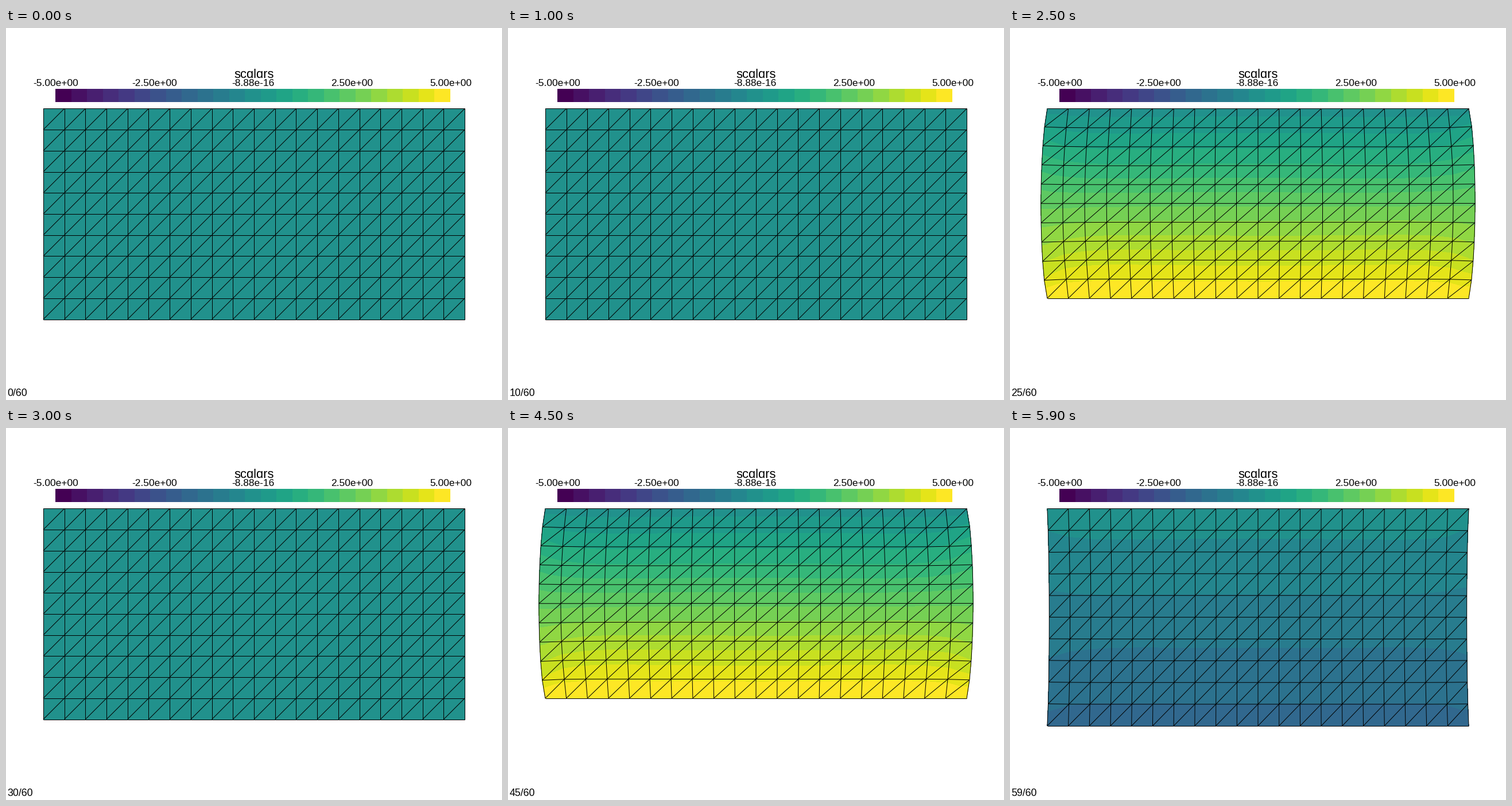
A matplotlib script for the animation above (6 s loop, 864 px wide and 648 px high).

```python
import numpy as np
import matplotlib.pyplot as plt
from matplotlib.animation import FuncAnimation
from matplotlib.collections import LineCollection
from matplotlib.patches import Rectangle
from matplotlib.tri import Triangulation

W, H, DPI = 864, 648, 72
FRAMES, PERIOD = 60, 20
NX, NY = 20, 10
LENGTH, HEIGHT = 100.0, 50.0
PULL, POISSON = 5.0, 0.3
SCALE = 7.342                # pixels per length unit
LEFT, BOTTOM = 64.9, 507.5
BINS = 25
FONT = ["Liberation Sans", "DejaVu Sans"]


def make_mesh():
    gx, gy = np.meshgrid(np.linspace(0, LENGTH, NX + 1),
                         np.linspace(0, HEIGHT, NY + 1))
    points = np.column_stack([gx.ravel(), gy.ravel()])
    cells = []
    for j in range(NY):
        for i in range(NX):
            a = j * (NX + 1) + i
            b, c, d = a + 1, a + NX + 2, a + NX + 1
            cells += [(a, b, c), (a, c, d)]
    return points, np.array(cells)


def solve_elastic(points, cells):
    """Plane-strain displacement: top clamped, bottom moved up by PULL."""
    lam = POISSON / ((1 + POISSON) * (1 - 2 * POISSON))
    mu = 1 / (2 * (1 + POISSON))
    law = np.array([[lam + 2 * mu, lam, 0], [lam, lam + 2 * mu, 0], [0, 0, mu]])
    size = 2 * len(points)
    stiff = np.zeros((size, size))
    for cell in cells:
        x, y = points[cell].T
        area2 = (x[1] - x[0]) * (y[2] - y[0]) - (x[2] - x[0]) * (y[1] - y[0])
        dx = (np.roll(y, -1) - np.roll(y, 1)) / area2
        dy = (np.roll(x, 1) - np.roll(x, -1)) / area2
        strain = np.zeros((3, 6))
        strain[0, 0::2] = strain[2, 1::2] = dx
        strain[1, 1::2] = strain[2, 0::2] = dy
        dofs = np.column_stack([2 * cell, 2 * cell + 1]).ravel()
        stiff[np.ix_(dofs, dofs)] += strain.T @ law @ strain * area2 / 2

    low = np.flatnonzero(points[:, 1] == 0)
    high = np.flatnonzero(points[:, 1] == HEIGHT)
    fixed = np.concatenate([2 * low, 2 * low + 1, 2 * high, 2 * high + 1])
    free = np.setdiff1d(np.arange(size), fixed)
    u = np.zeros(size)
    u[2 * low + 1] = PULL
    load = -stiff[np.ix_(free, fixed)] @ u[fixed]
    u[free] = np.linalg.solve(stiff[np.ix_(free, free)], load)
    return u.reshape(-1, 2)


def to_pixels(p):
    return np.column_stack([LEFT + SCALE * p[:, 0], BOTTOM - SCALE * p[:, 1]])


points, cells = make_mesh()
shape = solve_elastic(points, cells)
edges = Triangulation(*points.T, cells).edges
colors = plt.get_cmap("viridis")(np.linspace(0, 1, BINS))
levels = np.linspace(-PULL, PULL, BINS + 1)
levels[0] -= 1
levels[-1] += 1

fig = plt.figure(figsize=(W / DPI, H / DPI), dpi=DPI, facecolor="white")
ax = fig.add_axes([0, 0, 1, 1])
ax.set_xlim(0, W)
ax.set_ylim(H, 0)
ax.axis("off")


def label(x, y, text, size, align="center"):
    return ax.text(x, y, text, fontsize=size, family=FONT, color="black",
                   ha=align, va="baseline")


# Colour bar
BAR_X, BAR_Y, BAR_W, BAR_H = 86, 106, 688, 23
bounds = np.round(np.linspace(BAR_X, BAR_X + BAR_W, BINS + 1))
for x0, x1, color in zip(bounds[:-1], bounds[1:], colors):
    ax.add_patch(Rectangle((x0, BAR_Y), x1 - x0, BAR_H, fc=color, lw=0,
                           antialiased=False))
ticks = ["-5.00e+00", "-2.50e+00", "-8.88e-16", "2.50e+00", "5.00e+00"]
for k, tick in enumerate(ticks):
    label(BAR_X + 0.5 + k * BAR_W / 4, 101, tick, 17.4)
# Single-storey letter a
label(432, 87, "sc\u0251l\u0251rs", 22)

wire = LineCollection([], colors="black", linewidths=1, zorder=3)
ax.add_collection(wire, autolim=False)
counter = label(2.5, 641, "", 17.8, "left")
fill = None


def draw(i):
    global fill
    if fill is not None:
        fill.remove()
    u = shape * np.sin(2 * np.pi * i / PERIOD)
    p = to_pixels(points + u)
    fill = ax.tricontourf(Triangulation(*p.T, cells), u[:, 1],
                          levels=levels, colors=colors, zorder=2)
    wire.set_segments(p[edges])
    counter.set_text(f"{i}/{FRAMES}")
    return fill, wire, counter


anim = FuncAnimation(fig, draw, frames=FRAMES, interval=100, repeat=True,
                     repeat_delay=0, init_func=lambda: draw(0), blit=False)
plt.show()
```
